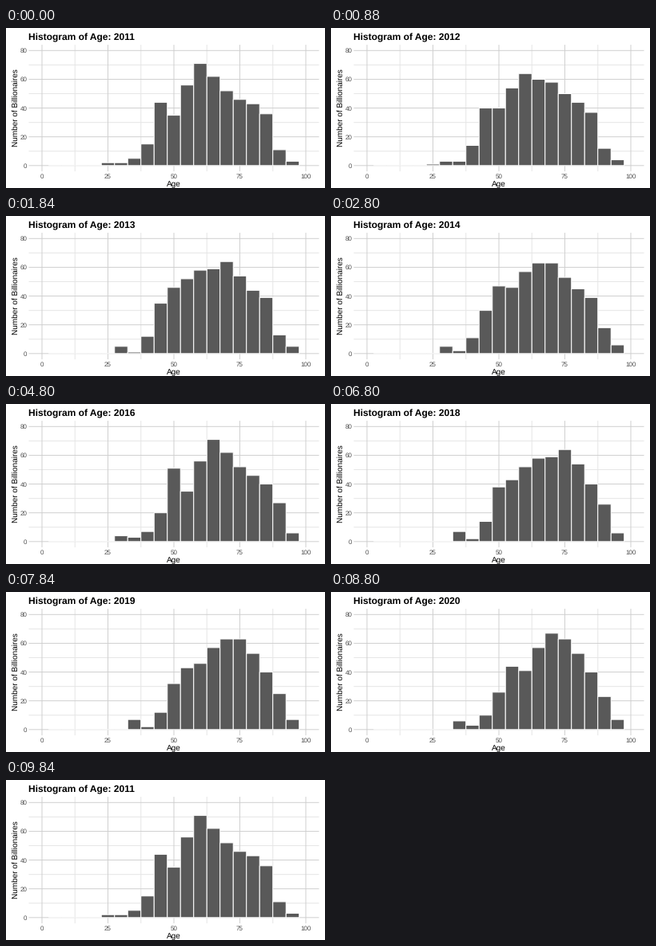
A matplotlib script that plays this animation: 399x201 px, repeating every 9.92 s.

```python
import numpy as np
import matplotlib.pyplot as plt
from matplotlib.animation import FuncAnimation
from matplotlib.patches import Rectangle

W, H, DPI = 399, 201, 64
PT = 72 / DPI  # points per pixel
STEP, FRAMES = 80, 124
START, YEARS = 2011, 10
BINS = np.arange(5, 100, 5)

# People by age in the first year: bands of three and two years, from 22.5 up
COHORTS = [0, 2, 2, 0, 1, 4, 6, 9, 22, 22, 21, 14, 38, 18, 40,
           31, 28, 34, 30, 22, 32, 14, 30, 13, 27, 9, 5, 6, 0, 3]
EDGES = 22.5 + np.cumsum([0] + [3, 2] * (len(COHORTS) // 2))
TOTALS = np.cumsum([0] + COHORTS)

plt.rcParams.update({"font.family": "Liberation Sans",
                     "text.hinting": "no_hinting"})
fig = plt.figure(figsize=(W / DPI, H / DPI), dpi=DPI, facecolor="white")
ax = fig.add_axes([0, 0, 1, 1])
ax.set(xlim=(0, W), ylim=(H, 0))
ax.axis("off")


def px(age):
    return 45 + 3.3 * age


def py(count):
    return 172.8 - 1.806 * count


def histogram(t):
    """Every cohort grows t years older; the young gain, the oldest thin out."""
    younger = np.interp(BINS - 2.5 - t, EDGES, TOTALS)
    older = np.interp(BINS + 2.5 - t, EDGES, TOTALS)
    gain = 0.006 * np.maximum(0, 55 - BINS)
    loss = 0.007 * np.maximum(0, BINS - 83)
    return np.round((older - younger) * (1 + t * (gain - loss)))


def grid(ages, counts, color):
    style = dict(color=color, lw=PT, solid_capstyle="butt", snap=False)
    for c in counts:
        ax.plot([px(-5), px(105)], [py(c)] * 2, zorder=1, **style)
    for a in ages:
        ax.plot([px(a)] * 2, [py(-4), py(84)], zorder=1, **style)


def label(x, y, text, size, **kw):
    kw = {"ha": "center", "va": "baseline", "color": "black", **kw}
    return ax.text(x, y, text, fontsize=size * PT,
                   rotation_mode="anchor", **kw)


grid(np.arange(12.5, 100, 25), range(10, 80, 20), "#e6e6e6")
grid(range(0, 101, 25), range(0, 81, 20), "#d0d0d0")

for a in range(0, 101, 25):
    label(px(a), 189, str(a), 8, color="#4d4d4d")
for c in range(0, 81, 20):
    label(26.3, py(c) + 2.9, str(c), 8, ha="right", color="#4d4d4d")

label(px(50), 199, "Age", 10)
label(14.5, py(40), "Number of Billionaires", 10, rotation=90)
title = label(28.5, 15.5, "", 12, ha="left", weight="bold")

# Empty bins still draw a white outline along the baseline
bars = [
    ax.add_patch(Rectangle((px(a - 2.5), py(0)), 16.5, 0, fc="#595959",
                           ec="white", lw=PT, snap=False, zorder=2))
    for a in BINS
]


def update(n):
    t = (2 * n + 5) // 25 % YEARS
    title.set_text(f"Histogram of Age: {START + t}")
    for bar, count in zip(bars, histogram(t)):
        bar.set_height(py(count) - py(0))
    return [title, *bars]


anim = FuncAnimation(fig, update, frames=FRAMES, interval=STEP,
                     repeat=True, repeat_delay=0)
plt.show()
```
